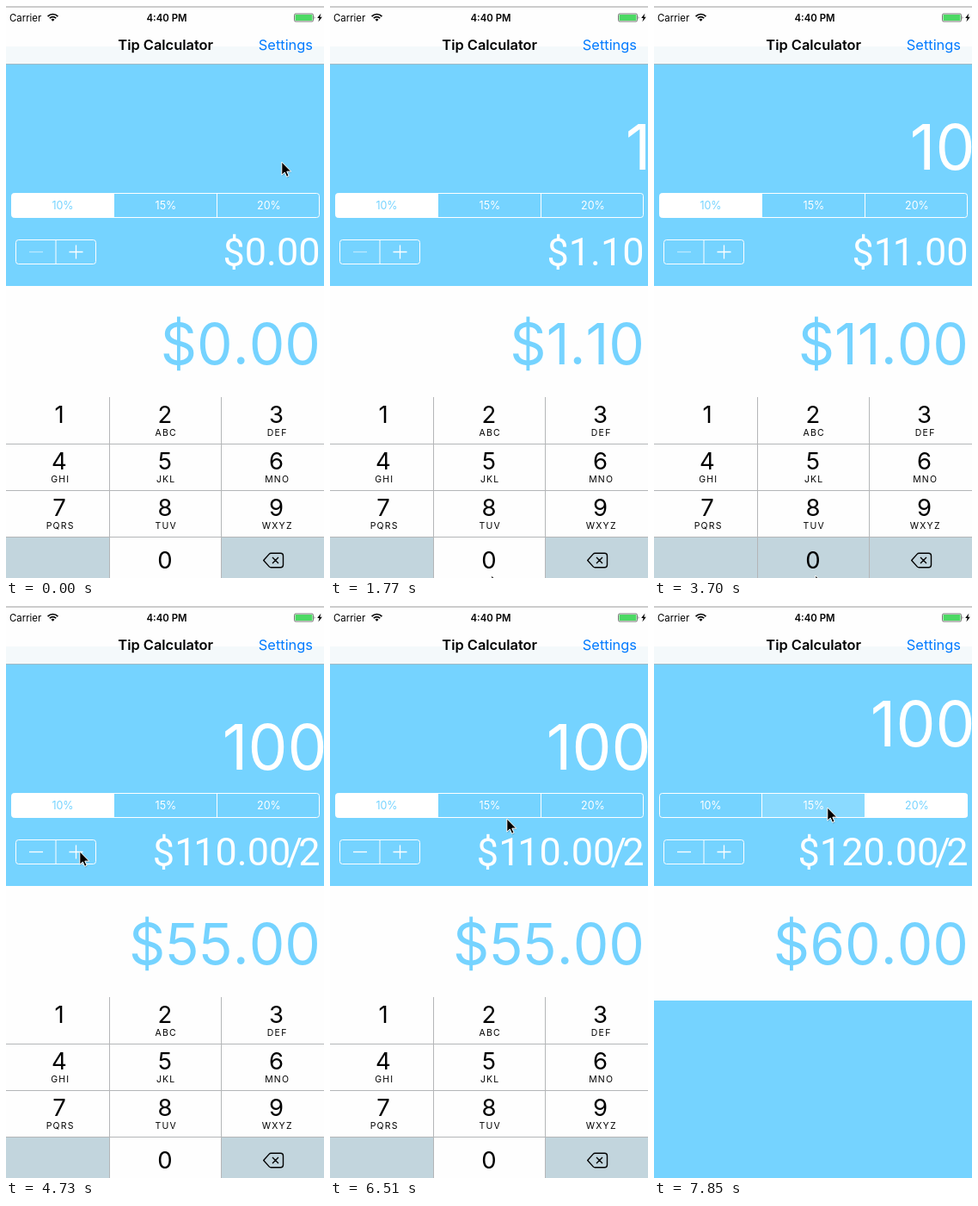
Animation of 370x664 px, one loop 8 s. Source, as an HTML page:

```html
<!DOCTYPE html>
<html lang="en">
<head>
<meta charset="utf-8">
<title>Tip Calculator</title>
<style>
  html, body { margin: 0; width: 100%; height: 100%; overflow: hidden; background: #fefefe; }
  svg { display: block; width: 370px; height: 664px; font-family: Inter, Roboto, sans-serif; }
  .blue { fill: #75d3ff; }
  .end { text-anchor: end; }
  .mid { text-anchor: middle; }
  .line { fill: none; stroke: #fff; stroke-width: 1; }
  .status { font-size: 11.4px; }
  .bar { font-size: 16.4px; }
  #bill { font-size: 73px; font-kerning: none; fill: #fff; }
  #total { font: 45px Roboto, "Liberation Sans", sans-serif; fill: #fff; }
  #share { font-size: 66px; font-kerning: none; }
  .seg text { font-size: 12.5px; }
  .digit { font-size: 27.5px; }
  .letters { font-size: 10.5px; letter-spacing: 1.2px; }
  .grid { fill: none; stroke: #b4b6b8; stroke-width: 1; }
</style>
</head>
<body>
<svg viewBox="0 0 370 664">
  <rect width="370" height="664" fill="#fefefe"/>

  <!-- navigation and status bars -->
  <rect y="47" width="370" height="20" fill="#f4f9fb"/>
  <rect width="370" height="2" fill="#cdcdcd"/>
  <text class="status" x="4" y="17.5">Carrier</text>
  <g fill="none" stroke="#000" stroke-width="1.7">
    <path d="M48.6 12.1a8 8 0 0 1 11.8 0M50.8 14.3a5 5 0 0 1 7.4 0"/>
    <path d="M54.5 17.8l-2-2.1a3 3 0 0 1 4 0z" fill="#000" stroke="none"/>
  </g>
  <text class="status mid" x="187" y="17.5" font-weight="600">4:40 PM</text>
  <rect x="335.5" y="9" width="22" height="9" rx="1.5" fill="#fff" stroke="#555" stroke-width=".8"/>
  <rect x="336.5" y="10" width="20" height="7" rx=".6" fill="#4cd964"/>
  <path d="M358.7 11.8q1.6 1.7 0 3.4z" fill="#555"/>
  <path d="M366.4 8.6l-4.2 5.4h2.4l-1.2 4.4 4.4-5.6h-2.5z"/>
  <text class="bar mid" x="185.7" y="51" font-weight="600">Tip Calculator</text>
  <text class="bar end" x="357" y="51" fill="#007aff">Settings</text>

  <!-- amounts and controls -->
  <rect class="blue" y="67" width="370" height="258"/>
  <rect y="67" width="370" height="1" fill="#9fb9c6"/>
  <text id="bill" class="end" x="373.5"></text>
  <g id="segs"></g>
  <rect class="line" x="6.5" y="217.5" width="358" height="28" rx="3"/>
  <path class="line" d="M125.5 218v27M245.5 218v27"/>
  <rect id="press" x="59" y="272" width="45" height="27" fill="#fff" opacity=".25"/>
  <rect class="line" x="11.5" y="271.5" width="93" height="28" rx="3"/>
  <path class="line" d="M58 272v27"/>
  <path id="minus" d="M27 285.5h16" stroke="#fff" stroke-width="1.3"/>
  <path d="M73.5 285.5h16M81.5 277.5v16" stroke="#fff" stroke-width="1.3"/>
  <text id="total" class="end" x="365.5" y="301"></text>
  <text id="share" class="end blue" x="366" y="416"></text>

  <rect class="blue" y="458" width="370" height="206"/>
  <g id="pad">
    <rect y="454" width="370" height="210" fill="#fefefe"/>
    <g id="keys"></g>
    <path class="grid" d="M120.5 454v210M250.5 454v210M0 508.5h370M0 562.5h370M0 616.5h370"/>
    <g id="labels"></g>
    <path d="M299.7 643.5l6.6-7.4q.8-.9 2-.9h11.2q3 0 3 3v10.6q0 3-3 3h-11.2q-1.2 0-2-.9zM310 640l7 7M317 640l-7 7"
      fill="none" stroke="#000" stroke-width="1.4" stroke-linejoin="round"/>
  </g>

  <g id="cursor">
    <path id="arrow" d="M.8 0v15.2l3.5-3.2 2.3 5.3 2.5-1.1-2.3-5.1h4.9z" stroke="#fff"/>
  </g>
</svg>

<script>
const $ = id => document.getElementById(id);
const LOOP = 8000, TICKS = 54, LEAD = 14;
const PRESSED = '#c2d5dd', BLUE = '#75d3ff', WHITE = '#fefefe';

function add(parent, tag, attrs, text = '') {
  const el = document.createElementNS('http://www.w3.org/2000/svg', tag);
  for (const k in attrs) el.setAttribute(k, attrs[k]);
  el.textContent = text;
  return parent.appendChild(el);
}

// pointer shadow, behind the arrow
$('cursor').prepend(add($('cursor'), 'path',
  { d: $('arrow').getAttribute('d'), transform: 'translate(.6 1.4)', opacity: .2 }));

// keypad
const colX = [0, 121, 251], colW = [120, 129, 119], midX = [62, 185, 314.5];
const letters = ['', 'ABC', 'DEF', 'GHI', 'JKL', 'MNO', 'PQRS', 'TUV', 'WXYZ'];
const keys = {};
function addKey(name, col, row, fill) {
  keys[name] = add($('keys'), 'rect',
    { x: colX[col], y: 455 + row * 54, width: colW[col], height: 53, fill });
}
function addDigit(name, col, y) {
  add($('labels'), 'text', { class: 'digit mid', x: midX[col], y }, name);
}
letters.forEach((word, i) => {
  const col = i % 3, row = Math.floor(i / 3);
  addKey(i + 1, col, row, WHITE);
  addDigit(i + 1, col, 484 + row * 54);
  add($('labels'), 'text',
    { class: 'letters mid', x: midX[col] + 1.2, y: 499 + row * 54 }, word);
});
addKey('blank', 0, 3, PRESSED);
addKey('0', 1, 3, WHITE);
addKey('delete', 2, 3, PRESSED);
addDigit('0', 1, 653);

// tip choices
const segs = [10, 15, 20].map((tip, i) => {
  const g = add($('segs'), 'g', { class: 'seg' });
  const x = [6.5, 125.5, 245.5][i];
  const box = add(g, 'rect',
    { x, y: 217.5, width: 119.5, height: 28, rx: i === 1 ? 0 : 3, fill: '#fff' });
  const label = add(g, 'text', { class: 'mid', x: 66 + i * 120, y: 236 }, tip + '%');
  return { tip, box, label };
});

// what changes, by tick
const changes = [
  [0, { bill: '', tip: 10, people: 1, key: '', plus: false, seg: 0, pad: true }],
  [7, { key: '1' }], [8, { key: '', bill: '1' }],
  [15, { key: '0' }], [16, { key: '', bill: '10' }],
  [25, { key: '0' }], [26, { key: '', bill: '100' }],
  [31, { plus: true }], [32, { plus: false, people: 2 }],
  [34, { plus: true }], [35, { plus: false, people: 3 }],
  [40, { people: 2 }],
  [47, { pad: false }],
  [48, { seg: 20 }], [49, { seg: 0, tip: 20 }],
  [53, { seg: 15 }]
];

// pointer stops: tick, x, y
const stops = [
  [0, 320, 181], [2, 320, 181], [6, 62, 478], [8, 62, 478], [10, 170, 645],
  [12, 187, 661], [26, 187, 661], [30, 85, 285], [36, 85, 285], [39, 28, 279],
  [40, 28, 279], [44, 205, 247], [46, 205, 247], [47, 288, 237], [51, 288, 237],
  [53, 201, 234]
];

function pointer(tick) {
  const i = Math.max(1, stops.findIndex(s => s[0] >= tick));
  const [t0, x0, y0] = stops[i - 1], [t1, x1, y1] = stops[i];
  const u = (tick - t0) / (t1 - t0), e = u * u * (3 - 2 * u);
  return [x0 + (x1 - x0) * e, y0 + (y1 - y0) * e];
}

// pair kerning for the total line
function kern(text) {
  return [...text].map((c, i) =>
    c === '1' && text[i - 1] === '1' ? -3.3 :
    c === '/' || text[i - 1] === '/' ? -4.8 : 0).join(' ');
}

function draw(tick) {
  const s = Object.assign({}, ...changes.filter(c => c[0] <= tick).map(c => c[1]));
  const sum = s.bill * (1 + s.tip / 100);
  const total = '$' + sum.toFixed(2) + (s.people > 1 ? '/' + s.people : '');

  $('bill').textContent = s.bill;
  $('bill').setAttribute('y', s.pad ? 190 : 163);
  $('total').textContent = total;
  $('total').setAttribute('dx', kern(total));
  $('share').textContent = '$' + (sum / s.people).toFixed(2);
  $('minus').setAttribute('opacity', s.people > 1 ? 1 : .5);
  $('press').style.display = s.plus ? '' : 'none';
  $('pad').style.display = s.pad ? '' : 'none';
  for (const k of ['0', '1']) keys[k].setAttribute('fill', s.key === k ? PRESSED : WHITE);
  for (const { tip, box, label } of segs) {
    box.setAttribute('opacity', tip === s.tip ? 1 : tip === s.seg ? .15 : 0);
    label.setAttribute('fill', tip === s.tip ? BLUE : '#fff');
  }
  $('cursor').setAttribute('transform', `translate(${pointer(tick)})`);
}

let start, last = -1;
function frame(now) {
  start ??= now;
  const t = (now - start) % LOOP;
  const tick = Math.min(TICKS - 1, Math.floor((t + LEAD) * TICKS / LOOP));
  if (tick !== last) draw(last = tick);
  requestAnimationFrame(frame);
}
draw(0);
requestAnimationFrame(frame);
</script>
</body>
</html>
```
